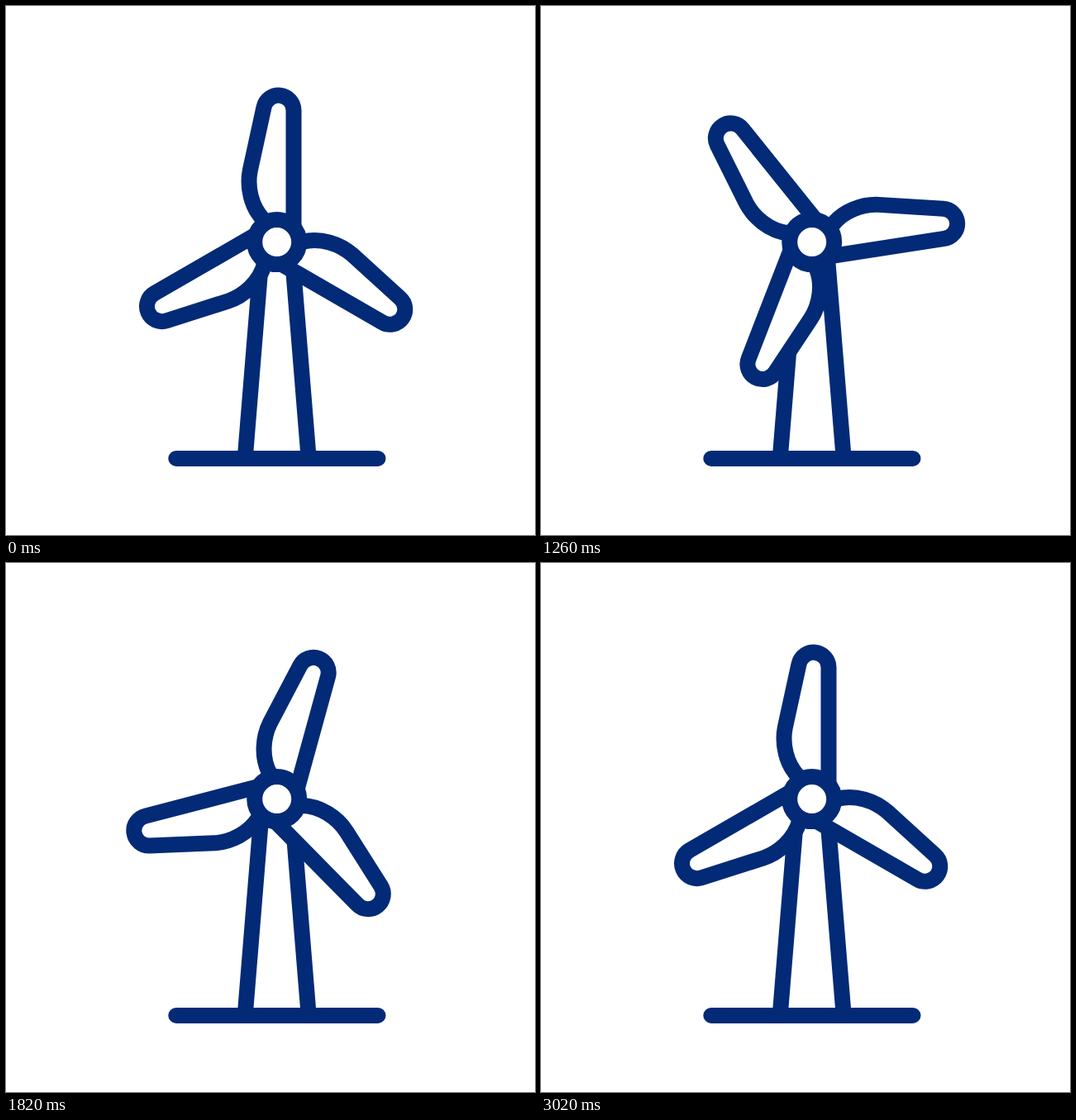
Animation of 640x640 px, one loop 3600 ms. Source, as an HTML page:

```html
<!DOCTYPE html>
<html>
<head>
<meta charset="utf-8">
<style>
html, body { margin: 0; height: 100%; overflow: hidden; background: #fff; }
svg { display: block; width: 100%; height: 100%; }
</style>
</head>
<body>
<svg viewBox="0 0 640 640" fill="none" stroke="#032a76" stroke-width="19">
  <path d="M308.8 306 289.4 545M346.6 306 366 545"/>
  <path d="M205.8 547.4H450" stroke-linecap="round"/>
  <g id="rotor" fill="#fff">
    <defs>
      <path id="blade" d="M348 272V126.5A18.2 18.2 0 0 0 312 122.5L295.3 199C291.5 218 296 243 312 259"/>
    </defs>
    <use href="#blade"/>
    <use href="#blade" transform="rotate(120 327.7 285.6)"/>
    <use href="#blade" transform="rotate(240 327.7 285.6)"/>
  </g>
  <circle cx="327.7" cy="285.6" r="27" fill="#fff"/>
</svg>
<script>
const LOOP = 3600, SPIN = 3000;
const rotor = document.getElementById('rotor');

// One cubic Bezier coordinate running from 0 to 1
const bezier = (a, b, u) => 3 * a * u * (1 - u) ** 2 + 3 * b * u * u * (1 - u) + u ** 3;

function ease(p) {
  let low = 0, high = 1;
  for (let i = 0; i < 30; i++) {
    const mid = (low + high) / 2;
    if (bezier(0.72, 0.37, mid) < p) low = mid; else high = mid;
  }
  return bezier(0, 1, low);
}

function draw(now) {
  const p = Math.min((now % LOOP) / SPIN, 1);
  const angle = p < 1 ? 360 * ease(p) : 0;
  rotor.setAttribute('transform', `rotate(${angle} 327.7 285.6)`);
  requestAnimationFrame(draw);
}
requestAnimationFrame(draw);
</script>
</body>
</html>
```
